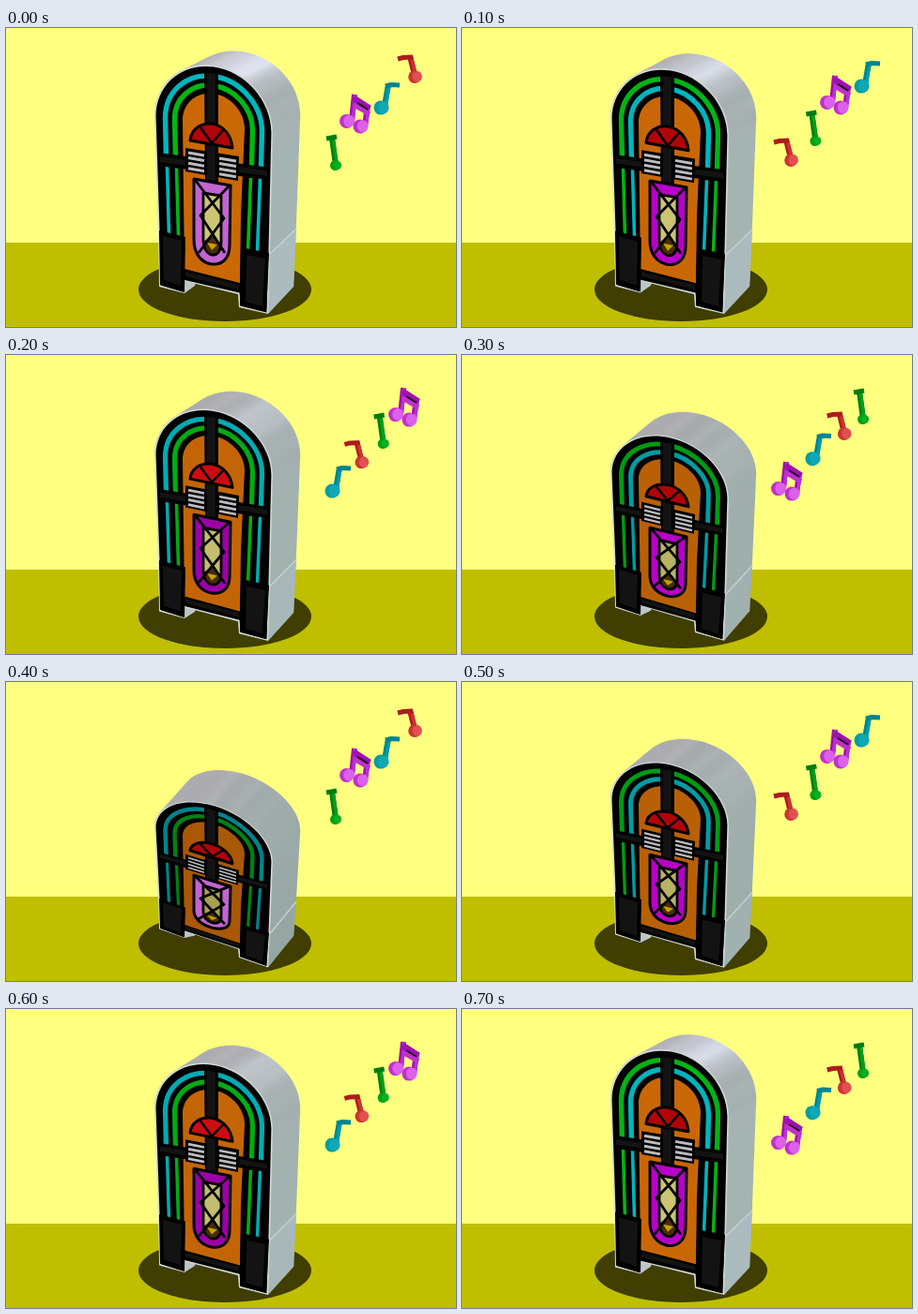
Recreate the animation shown at these times as an HTML page. Size 479 by 319 pixels, loop 800 ms.

```html
<!DOCTYPE html>
<html lang="en">
<head>
<meta charset="utf-8">
<title>Dancing jukebox</title>
<style>
html, body { margin: 0; width: 100%; height: 100%; overflow: hidden; background: #ffff80; }
svg { display: block; width: 100vw; height: 100vh; }
</style>
</head>
<body>
<svg viewBox="0 0 479 319" preserveAspectRatio="none">
  <rect width="480" height="320" fill="#ffff80"/>
  <rect y="229" width="480" height="91" fill="#bfbf00"/>
  <ellipse cx="233" cy="279" rx="92" ry="34" fill="#403e00"/>
  <g id="box"></g>
  <g id="notes"></g>
</svg>
<script>
const STEP = 100, STEPS = 8, SLOTS = 4;
const box = document.getElementById('box');
const notes = document.getElementById('notes');

const lerp = (a, b, t) => a + (b - a) * t;
const mix = (a, b, t) => `rgb(${a.map((v, i) => Math.round(lerp(v, b[i], t)))})`;

// 0 is upright, 1 is fully squashed halfway through the loop.
const squashAt = step => Math.pow(1 - Math.abs(step - STEPS / 2) / (STEPS / 2), 2.3);

// Places a point of the upright front, pushed back by depth z, in the squashed pose.
function place(x, y, z, s) {
  const bulge = Math.max(0, 0.0004 * (y - 44) * (277 - y));
  const low = 62.5 + 0.2 * x + 0.61 * y + bulge;
  const rise = lerp(15 + (y - 40) * 0.053, 33.5, s);
  return [x + z * (30 - (y - 40) * 0.011), lerp(y, low, s) - z * rise];
}

// In a path, a pair followed by ' lies on the back.
const bend = (d, s, z = 0) => d.replace(/([\d.]+) ([\d.]+)('?)/g, (m, x, y, back) =>
  place(+x, +y, back ? 1 : z, s).map(v => v.toFixed(1)).join(' '));

// The sheared round top, from the left side to the right, inset from the rim.
const MID = 221, RADIUS = 63, SHEAR = 0.14;
function arch(inset) {
  const h = RADIUS - inset, k = 0.55 * h, top = 40 + inset;
  const left = MID - h, right = MID + h, ly = 103 - SHEAR * h, ry = 103 + SHEAR * h;
  return `${left} ${ly} C${left} ${ly - k} ${MID - k} ${top - SHEAR * k} ${MID} ${top} ` +
    `C${MID + k} ${top + SHEAR * k} ${right} ${ry - k} ${right} ${ry}`;
}

const face = i => `M${arch(i)} L${281 - i} 240 L${279 - i} ${305 - i} L${248 + i} ${298 - i} ` +
  `L${247 + i} ${284 - i} L${190 - i} ${270 - i} L${190 - i} ${283 - i} L${163 + i} ${276 - i} L${162 + i} 217 Z`;

function metal(s) {
  const a = place(207, 38, 1, s), b = place(284, 112, 1, s), f = place(207, 38, 0, s);
  const nx = f[1] - a[1], ny = a[0] - f[0];
  const len = 1.3 * ((b[0] - a[0]) * nx + (b[1] - a[1]) * ny) / (nx * nx + ny * ny);
  let stops = '';
  for (let t = 0; t <= 1; t += 0.0625) {
    const glow = Math.exp(-4 * s - Math.pow((t - 0.2 - 0.6 * s) / 0.16, 2));
    const ripple = 6 * Math.sin(t * 32) * (1 - t) + 52 * glow;
    const tone = [lerp(172, 164, t), lerp(172, 180, t), lerp(176, 178, t) + 10 * glow].map(v => v + ripple);
    stops += `<stop offset="${t}" stop-color="${mix(tone, [152, 168, 165], s * t)}"/>`;
  }
  return `<defs><linearGradient id="metal" gradientUnits="userSpaceOnUse" x1="${a[0]}" y1="${a[1]}"
    x2="${a[0] + nx * len}" y2="${a[1] + ny * len}">${stops}</linearGradient></defs>`;
}

function jukebox(step) {
  const s = squashAt(step);
  const fill = (c, d) => `<path fill="${c}" d="${bend(d, s)}"/>`;
  const line = (c, w, d) => `<path fill="none" stroke="${c}" stroke-width="${w}" stroke-linejoin="round" d="${bend(d, s)}"/>`;
  const panel = (c, w, d) => fill(c, d) + line('#000', w, d);
  const tube = (c, i) => {
    const l = MID - RADIUS + i, r = MID + RADIUS - i;
    return line(c, 5.4 - s, `M${l + 1} 140 L${arch(i)} L${r - 1} 148`) +
      line(c, 3.6 - 0.4 * s, `M${l + 2} 148 L${l + 4} 222 M${r - 2} 160 L${r - 5} 238`);
  };
  const cyan = mix([0, 182, 190], [0, 130, 138], s);
  const green = mix([0, 182, 20], [0, 128, 20], s);
  const purple = step % 4 === 0 ? '#c264d2' : step % 2 ? '#b800c8' : '#9c00a8';
  const red = step % 4 === 2 ? '#cc0c10' : '#b00408';
  const dark = '#131313';
  let out = metal(s);

  // cabinet, swept from back to front
  const side = `M${arch(0)} L281 240 L279 305 Z`;
  let sweep = '';
  for (let z = 1; z > 0; z -= 1 / 24) sweep += bend(side, s, z);
  out += `<path fill="url(#metal)" d="${sweep}"/>`;
  out += fill(mix([172, 188, 190], [150, 166, 163], s), "M281 240 L281 240' L279 305' L279 305 Z");
  out += line('#c4d0d0', 1.5, "M281 241 L281 240'");
  out += fill('#bcc6c6', 'M189 268 L202 271 L201 275 L190 283 Z');
  out += fill('#d2d9d9', face(0)) + fill('#000', face(1.6));
  out += fill(mix([202, 104, 6], [168, 88, 6], s), `M190 257 L189 180 L${arch(30)} L250 200 L249 272 Z`);

  // light tubes swap colours on each beat
  out += tube(step % 2 ? green : cyan, 11.5) + tube(step % 2 ? cyan : green, 21.5);

  // pillar, band and slats
  out += fill('#000', 'M211 44 L226 45 L226 168 L212 166 Z');
  out += fill('#000', 'M162 133 L281 149 L280 162 L162 147 Z');
  out += fill(dark, 'M164 137 L278 152 L278 158 L164 143 Z');
  out += fill('#000', 'M191 128 L248 137 L247 163 L191 153 Z');
  for (let y = 133; y < 152; y += 5.6) {
    out += line('#bcbcc0', 3 - 1.4 * s, `M194 ${y} L211 ${y + 3} M227 ${y + 6} L245 ${y + 9}`);
  }
  out += fill(dark, 'M214 48 L223 49 L223 163 L214 162 Z');

  // fan
  out += panel(red, 3, 'M196 120 C197 108 207 101 219 102 C232 104 240 115 241 128 Z');
  out += line('#000', 2.6, 'M207 106 L219 123 L231 109');

  // window
  const pane = 'M210 176 L229 179 L229 228 C229 238 225 243 219 242 C212 240 210 234 210 224 Z';
  out += panel(purple, 3, 'M200 161 L239 168 L238 232 C238 246 230 253 219 252 C207 250 200 240 200 226 Z');
  out += fill(mix([204, 198, 116], [166, 160, 84], s), pane);
  out += fill('#4a2c00', 'M219 221 L229 230 C228 239 224 242 219 241 C213 240 210 235 210 228 Z');
  out += fill('#c0a400', 'M214 229 L225 231 L219 237 Z');
  out += line('#000', 2.8, pane);
  out += line('#000', 2.8, 'M202 163 L232 203 L205 240 M237 169 L207 200 L233 240');

  // feet
  out += fill(dark, 'M191 260 L248 274 L248 279 L191 265 Z');
  out += fill('#000', 'M163 216 L191 223 L190 282 L164 274 Z M250 234 L280 240 L277 303 L249 296 Z');
  out += fill(dark, 'M167 222 L187 227 L186 275 L168 269 Z M256 242 L276 246 L273 297 L255 292 Z');
  return out;
}

const bar = (c, w, d) => `<path fill="none" stroke="${c}" stroke-width="${w}" stroke-linejoin="bevel" d="${d}"/>`;
const stem = (n, d) => bar(n.dark, 6, d) + `<g transform="translate(1.2 .4)">${bar(n.mid, 3.4, d)}</g>`;
const head = (n, x, y, r) =>
  `<ellipse cx="${x - 1.5}" cy="${y + 0.6}" rx="${r}" ry="${r}" fill="${n.mid}"/>` +
  `<ellipse cx="${x + 1.2}" cy="${y + 0.4}" rx="${r - 1.6}" ry="${r - 1}" fill="${n.light}"/>`;

// Each note climbs through the slots by (run, rise), bent by its ease.
const NOTES = [
  { slot: 0, run: 76, rise: 78, ease: 1, light: '#08b020', mid: '#00a018', dark: '#007c10',
    art: n => stem(n, 'M347 117 L351 146') + bar(n.dark, 5, 'M341 118 L352 116') + head(n, 352, 146, 5.5) },
  { slot: 1, run: 78, rise: 79, ease: 0.55, light: '#dc60ea', mid: '#c030d0', dark: '#a010b0',
    art: n => stem(n, 'M345 114 L342 142') + stem(n, 'M359 126 L356 148') +
      bar(n.dark, 7, 'M344 118 L361 129') + bar(n.mid, 5, 'M346 126 L361 135') +
      bar('#201020', 2, 'M348 123 L359 130') + head(n, 338, 142, 7.5) + head(n, 352.5, 147.5, 7.5) },
  { slot: 2, run: 78, rise: 83, ease: 0.8, light: '#10a8b4', mid: '#009ca8', dark: '#008490',
    art: n => stem(n, 'M355 120 L351 143') + bar(n.dark, 5, 'M352 122 L358 120.5 L367 121') + head(n, 348.5, 144.5, 7.5) },
  { slot: 3, run: 85, rise: 89, ease: 1.1, light: '#e05050', mid: '#cc3434', dark: '#ac1c1c',
    art: n => stem(n, 'M345 119 L350 139') + bar(n.dark, 5, 'M332 122 L338 120.5 L348 120') + head(n, 351.5, 140.5, 6.8) }
];

const music = step => NOTES.map(n => {
  const t = (n.slot + step) % SLOTS / (SLOTS - 1);
  return `<g transform="translate(${n.run * t} ${-n.rise * Math.pow(t, n.ease)})">${n.art(n)}</g>`;
}).join('');

const begin = performance.now();
let shown = -1;
function draw() {
  const step = Math.floor((performance.now() - begin) / STEP) % STEPS;
  if (step !== shown) {
    shown = step;
    box.innerHTML = jukebox(step);
    notes.innerHTML = music(step);
  }
  requestAnimationFrame(draw);
}
draw();
</script>
</body>
</html>
```
